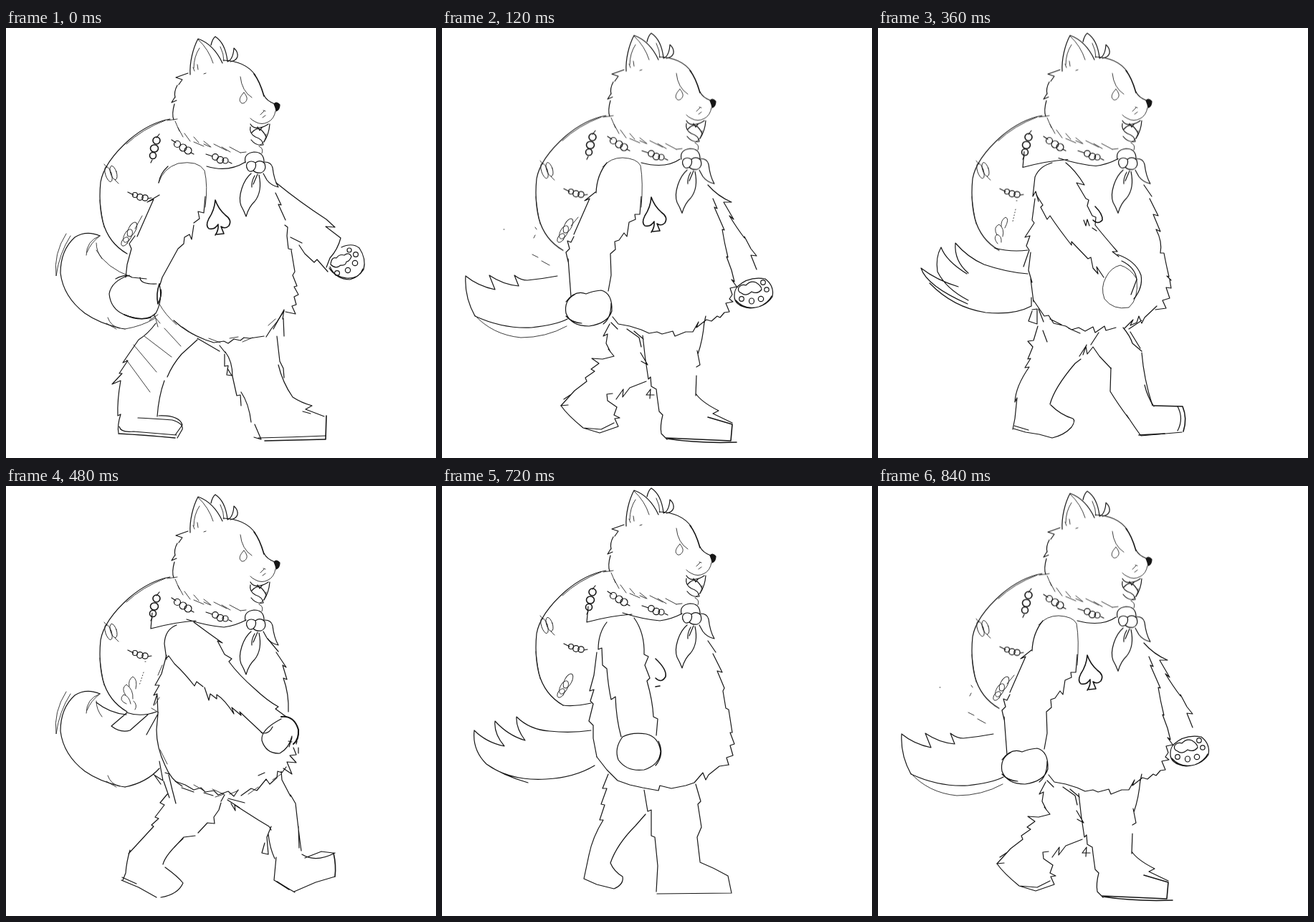
Animation of 600 by 600 pixels, one loop 0.96 s. Source, as an HTML page:

```html
<!DOCTYPE html>
<html lang="en">
<head>
<meta charset="utf-8">
<title>Walking wolf sketch</title>
<style>
  html, body { margin: 0; width: 100%; height: 100%; overflow: hidden; background: #fff; }
  svg { display: block; width: 100vw; height: 100vh; fill: none; stroke: #161616; stroke-width: 1.2; stroke-linecap: round; stroke-linejoin: round; }
  .thin { stroke-width: .9; stroke: #2a2a2a; }
  .bold { stroke-width: 1.6; }
  .nose { fill: #161616; }

  /* The walk swings from stride to stride and back in eight hard steps. */
  .pose, .bob { animation: 960ms step-end infinite; }
  .pose { visibility: hidden; }
  .stride { animation-name: stride; }
  .drop { animation-name: drop; }
  .pass { animation-name: pass; }
  .reach { animation-name: reach; }
  .swing { animation-name: swing; }
  .bob { animation-name: bob; }
  @keyframes stride { 0% { visibility: visible } 12.5%, 100% { visibility: hidden } }
  @keyframes drop { 0%, 25% { visibility: hidden } 12.5%, 87.5%, 100% { visibility: visible } }
  @keyframes pass { 0%, 37.5%, 87.5%, 100% { visibility: hidden } 25%, 75% { visibility: visible } }
  @keyframes reach { 0%, 50%, 75%, 100% { visibility: hidden } 37.5%, 62.5% { visibility: visible } }
  @keyframes swing { 0%, 62.5%, 100% { visibility: hidden } 50% { visibility: visible } }
  @keyframes bob {
    0%, 50%, 100% { transform: translateY(0) }
    12.5%, 37.5%, 62.5%, 87.5% { transform: translateY(-4.7px) }
    25%, 75% { transform: translateY(-9px) }
  }
</style>
</head>
<body>
<svg viewBox="0 0 600 600">
  <defs>
    <path id="spade" class="bold" d="M292 240Q291 254 283 266Q278 276 283 280Q291 282 296 274Q297 282 292 289M294 288L304 287 300 277Q306 281 311 276Q316 268 306 261Q296 252 292 240"/>
    <g id="curl">
      <path d="M131 290Q112 282 96 292Q76 310 76 342Q80 375 110 398Q130 412 160 419L166 420"/>
      <path class="thin" d="M84 287Q66 315 70 346Q74 315 90 290M131 290Q112 297 112 317M131 290Q118 300 113 313M126 300Q126 312 134 322M142 404Q146 416 158 419M140 412L154 420"/>
    </g>
    <g id="scarf">
      <path d="M204 177L202 199Q235 190 265 188M252 186Q280 195 304 197Q320 195 335 187"/>
    </g>
    <g id="fringe" class="thin">
      <ellipse cx="176" cy="281" rx="5" ry="11" transform="rotate(28 176 281)"/>
      <ellipse cx="170" cy="290" rx="5" ry="10" transform="rotate(28 170 290)"/>
      <ellipse cx="166" cy="298" rx="4" ry="7" transform="rotate(35 166 298)"/>
    </g>
  </defs>

  <g class="bob">
    <!-- ears and tuft -->
    <path d="M257 65C256 48 261 28 268 15Q290 23 302 49M286 24Q288 15 292 12Q306 21 309 46M309 47Q317 44 318 28Q324 33 323 40Q321 46 313 47"/>
    <path class="thin" d="M262 56Q262 40 270 28M267 51l1 7M268 16Q283 30 289 49M263 60l-2 -5M299 26Q304 36 304 46M276 64l3 -1"/>
    <!-- head -->
    <path d="M303 45Q334 46 348 66M375 106Q364 102 360 94M254 63L237 69 246 72 241 79M236 96L231 104 238 101M239 80Q234 89 236 97M235 106Q231 120 234 128"/>
    <path class="bold" d="M346 64Q354 74 360 95"/>
    <path class="nose" d="M374 106Q378 102 382 107Q382 114 377 116Q376 110 374 106Z"/>
    <path class="thin" d="M327 68Q329 88 343 97M332 90C326 96 324 102 329 105C333 106 337 101 336 97Q335 93 332 90"/>
    <path class="thin" d="M376 116Q374 127 366 131Q357 136 348 131Q342 128 341 126M355 121l5 -5M358 125l4 -3M359 115l3 1"/>
    <path d="M341 134Q345 141 354 139Q361 138 366 134M341 138Q339 147 348 152Q358 155 359 163Q349 165 342 156M368 134Q367 148 360 159M343 146Q350 138 356 142Q362 148 363 153M351 138l3 5 4 -5"/>
    <path class="thin" d="M236 130l6 14M240 139l7 13M249 147l8 11M262 152l7 8M262 159l14 6M276 158l10 8M285 166l-9 -4M290 162l18 9M301 166l12 7M312 166l15 8M327 174l8 -1M353 165Q360 168 357 175M363 148Q363 158 354 164"/>

    <!-- bundle -->
    <path d="M229 127Q200 132 172 156Q137 187 132 215Q129 245 135 270Q143 300 169 315"/>
    <path class="thin" d="M222 129Q190 141 168 162M131 240Q133 262 137 278M225 129l14 -2"/>
    <path d="M214 148l-4 5M204 184l-2 4M231 156l6 4M258 174l4 2M279 176l9 3M311 187l4 2M170 229l8 4M198 238l5 -1"/>
    <g class="bold">
      <circle cx="210" cy="157" r="5"/><ellipse cx="207" cy="168" rx="5.5" ry="5"/><circle cx="205" cy="178" r="4.5"/>
    </g>
    <circle cx="239" cy="162" r="4.5"/><circle cx="247" cy="167" r="5"/><circle cx="254" cy="171" r="5"/>
    <circle cx="292" cy="180" r="4.3"/><circle cx="299" cy="184" r="4.7"/><circle cx="306" cy="185" r="4"/>
    <circle cx="180" cy="233" r="3.5"/><circle cx="187" cy="236" r="4.3"/><circle cx="194" cy="237" r="4.2"/>
    <g class="thin">
      <ellipse cx="143" cy="204" rx="4.2" ry="11" transform="rotate(-18 143 204)"/>
      <ellipse cx="150" cy="202" rx="4.2" ry="10" transform="rotate(-18 150 202)"/>
    </g>
    <path class="thin" d="M137 190l4 5M152 212l5 5"/>

    <!-- knot -->
    <path d="M334 188Q331 175 346 173Q360 173 360 187M337 188Q342 184 348 188Q355 183 361 189Q364 199 356 202Q349 203 345 199Q339 202 337 197Q334 192 337 188M348 188Q350 194 345 199"/>
    <path d="M342 203C331 212 323 235 328 248Q332 255 335 263Q339 249 347 242Q358 228 353 205M347 206Q342 215 343 222"/>
    <path d="M361 187Q370 187 372 195Q374 212 380 222Q370 220 364 212L359 203M351 204L345 218"/>
  </g>

  <g class="pose stride">
    <use href="#spade"/>
    <use href="#curl"/>
    <use href="#fringe"/>
    <path d="M468 306Q483 299 493 307Q503 322 499 337Q491 350 476 349Q458 347 451 335M452 333Q460 351 480 351Q494 347 498 336"/>
    <path d="M453 330Q454 319 461 321Q465 315 472 317Q479 312 482 319Q479 326 475 326Q474 332 467 331Q460 337 453 330"/>
    <circle cx="462" cy="342" r="3.4"/><circle cx="477" cy="338" r="3.6"/><circle cx="487" cy="328" r="3.7"/><circle cx="488" cy="316" r="3.4"/><circle cx="479" cy="310" r="3"/>
    <path class="thin" d="M126 310Q140 335 174 347M166 420Q190 416 208 405M200 408l12 -8M205 400l10 12"/>
    <path class="thin" d="M213 216Q219 196 240 189Q268 184 277 199Q282 220 278 250M190 262l-10 18"/>
    <path d="M226 193Q215 203 213 216M214 233L197 243 206 239 183 291M280 193Q310 202 334 187"/>
    <path d="M180 290L172 301 175 308 169 330 167 348M278 235L276 258 268 256 270 266 262 272M262 275L259 295 256 288 249 292 248 301 240 308Q228 330 218 348L215 358"/>
    <path d="M172 345Q147 353 144 371Q146 392 165 400Q195 412 209 398Q219 380 214 357M153 350Q168 342 176 348L196 350M187 348Q187 358 210 357"/>
    <path class="bold" d="M214 357Q209 371 212 385Q218 373 216 365M165 400Q185 409 202 404"/>
    <path d="M377 216Q410 243 447 267L459 278 446 277 467 293Q463 309 452 321L447 334M397 292L413 300M409 303L417 315 430 327 434 323 449 340"/>
    <path d="M376 230L384 247 380 246 390 268M389 275L393 278 392 290 394 308 399 309M398 310L403 340 400 345 406 360 402 361 408 372 402 375 405 386 399 388 404 399 390 396"/>
    <path d="M388 395L378 410 370 420 363 431M360 430L340 433 332 432 327 436 318 434 310 440 304 437 290 439 278 435Q252 425 234 408"/>
    <path class="thin" d="M214 385Q222 400 238 414M246 417l14 10M283 433l16 6M312 433l12 -2M330 438l14 -6M366 415l10 -9"/>
    <path class="thin" d="M168 463L201 508M178 442L210 480M193 430L231 459M221 419L244 444M207 399L212 417"/>
    <path d="M209 412Q198 427 185 435L163 467 170 464 158 482 162 482 148 497 160 492Q155 520 156 541L160 539Q155 555 157 565M267 435L245 455Q232 470 225 487M221 492Q213 514 211 542M267 433L298 451"/>
    <path d="M184 544Q205 545 232 547Q248 552 246 560L239 572M213 541Q242 540 246 554L236 568M158 556Q160 565 178 563L238 568"/>
    <path class="bold" d="M157 566Q195 568 236 572M361 576L445 574M447 541L446 574"/>
    <path d="M298 443L306 453M305 455L305 472 310 471 308 484 315 485 309 475M306 452Q316 465 316 486L322 513 327 512 328 527M328 508Q339 524 342 550M347 553L356 574 346 571M352 572Q400 571 446 569"/>
    <path d="M373 420L388 393 386 406M378 430L382 465 387 475 388 488M380 470Q386 495 400 515M400 515Q412 523 427 527L418 532 444 542M387 405L388 430M414 535L425 538"/>
  </g>

  <g class="pose drop">
    <use href="#spade" y="-4"/>
    <use href="#fringe" y="-5"/>
    <path d="M412 361Q428 346 451 350Q464 360 461 375Q451 390 430 391Q407 388 408 373Q408 366 412 361M410 380Q422 394 442 389Q455 384 460 374"/>
    <path d="M414 362Q418 357 424 359Q430 352 438 355Q446 360 446 365Q440 372 432 368Q424 375 418 370Q412 368 414 362"/>
    <circle cx="418" cy="378" r="3.3"/><ellipse cx="432" cy="381" rx="3.5" ry="4"/><circle cx="445" cy="378" r="3.7"/><circle cx="453" cy="365" r="3.2"/><circle cx="448" cy="355" r="3.3"/>
    <path d="M33 346Q31 375 46 402Q85 420 125 418Q160 414 175 406M33 346Q50 360 74 365L66 345Q85 358 107 360L101 345Q110 352 119 352Q140 350 161 346"/>
    <path class="thin" d="M45 400Q70 428 110 432Q145 432 174 416M126 316l8 4M139 325l11 6M128 293l2 -4M86 281l1 0M130 278l2 3"/>
    <path d="M215 230Q216 205 230 188M214 229L199 241 206 238 184 288M278 188Q312 197 332 183"/>
    <path class="thin" d="M224 194Q235 181 252 181Q272 182 277 192Q281 215 278 250M190 264l-10 12"/>
    <path d="M184 291L180 299 175 297 178 308 173 313 176 326M176 322Q178 350 180 375M278 235L276 260 269 260 270 267 261 271 258 291 254 286 247 296 241 298 242 309 235 315 236 345 232 367"/>
    <path d="M185 372Q170 380 173 398Q180 416 205 416Q232 412 237 395Q238 370 222 366Q210 367 201 371M173 382Q186 365 201 371M236 384Q236 405 225 413M173 402Q181 411 195 412"/>
    <path d="M371 219Q385 235 404 243L393 243 407 267 401 262Q412 280 422 293M422 291L431 308 439 318 431 317 439 337"/>
    <path d="M378 238L384 252 380 250 394 282 391 281Q394 300 399 320L397 319 404 338 408 354 404 351 412 362"/>
    <path d="M411 361L402 363 405 372 401 378 406 382 396 384 401 396 394 397 388 404 384 402 376 409 369 407 355 418 358 410 350 424 340 424 325 430 322 423 307 427 300 424 289 426 278 421 262 416 246 413 238 403M366 411L368 402"/>
    <path d="M234 413L225 430 231 427 229 440 235 452M232 448L240 458 224 462 209 461 219 468 208 476 213 479 200 488 202 493 185 506 166 527 176 526"/>
    <path d="M166 527Q175 540 197 558L220 565 246 556 241 545 248 544 240 540 244 529 231 520 230 511 238 510M197 558L222 560 240 551M243 518L253 504 252 515 262 502 285 493M170 518l9 -6"/>
    <path d="M236 411L245 420M258 420L275 432 278 445M277 453L287 470 278 465M268 423L281 434M280 429Q283 460 288 490L291 487 292 500 299 504 300 513 303 535 308 540Q304 555 306 566L314 574"/>
    <path d="M285 512L291 504 290 517M285 512L296 512M366 410Q364 435 357 455M356 450L360 470 355 473M355 485L354 513M354 510Q362 522 386 534L378 538 405 551"/>
    <path class="bold" d="M371 543L405 553 403 576 313 572M314 573Q360 580 411 578"/>
  </g>

  <g class="pose pass">
    <use href="#scarf" y="-9"/>
    <use href="#fringe" y="-9"/>
    <path d="M45 341Q42 368 62 388Q95 412 145 409Q185 407 213 390M45 341Q62 358 87 363Q72 345 74 328Q92 348 116 355Q103 338 104 322Q122 340 150 342Q180 345 208 341M62 388Q85 404 120 414M169 306Q185 308 208 303"/>
    <path d="M230 190Q218 205 218 228L223 226 224 250 230 255Q232 280 236 298L242 294Q243 325 250 350M268 184Q283 205 282 235L288 238 283 250 290 268 286 272Q294 300 295 322L301 325 299 348"/>
    <path d="M252 350Q240 366 246 382Q258 399 282 396Q304 389 305 370Q302 350 285 346Q265 343 252 350M302 356Q311 375 298 390"/>
    <path class="bold" d="M298 241Q314 256 312 266Q306 276 298 268M298 280l6 -1"/>
    <path d="M216 232L212 264 206 286 212 284 207 300 211 304 205 328 211 334 211 352 216 378M371 216L382 232M378 234L391 260 384 258 394 282 392 286 396 310 400 312 405 344 402 344 408 360 402 362 406 376 397 379 400 389"/>
    <path d="M400 389L387 391 372 403 368 410 364 400 352 414 340 418 320 422 304 418 302 425 280 421 262 417 245 411 230 396 216 378"/>
    <path d="M232 402L224 422 230 422 222 444 227 445 220 466 225 466Q210 490 205 515L198 548M198 548L216 556 240 562Q254 556 252 545Q240 538 235 526M235 526Q244 500 270 474L284 458"/>
    <path d="M282 424L287 454 292 452 292 488 297 490 301 530 299 566M354 416L361 440 357 444 362 476 356 490 360 524M360 525Q380 533 399 544L404 568 300 569"/>
  </g>

  <g class="pose reach">
    <use href="#scarf" y="-4.5"/>
    <path d="M60 335Q82 352 112 361M60 335Q68 360 125 385M126 380Q95 364 83 340Q80 320 88 306Q95 325 124 343M126 342Q106 325 108 300Q125 320 148 330Q180 341 209 343"/>
    <path d="M72 356Q105 390 150 397Q190 401 214 388L214 376M163 307Q185 313 209 310"/>
    <path class="thin" d="M167 301Q160 293 166 288Q173 290 172 299M166 289Q160 278 169 274Q177 280 174 291M172 277Q171 268 178 264Q184 266 177 279"/>
    <path d="M193 241l2 0M192 253l-4 17" class="thin" stroke-dasharray="1 3"/>
    <path d="M262 188Q275 198 288 219L277 216 290 238 294 240 292 248 299 262 304 264 303 275Q315 290 334 312L327 312 336 319M243 188Q225 193 219 208L216 235 220 228 224 242"/>
    <path d="M221 233L230 247 227 250 236 267 240 262Q252 280 270 303L270 298 293 322 297 320 300 335 307 343 305 333 315 348"/>
    <path class="thin" d="M318 348Q310 362 316 378Q328 394 350 390Q364 378 361 350Q352 335 338 331Q325 334 318 348"/>
    <path d="M334 316Q360 325 367 345Q370 362 357 378M340 325Q359 334 361 351L353 372"/>
    <path class="bold" d="M303 249Q314 260 313 268Q307 275 300 268"/>
    <path d="M287 268l3 8 2 -9 3 9M299 279l6 4M219 238L215 268 218 272 205 292 212 290 207 304 211 310 203 333M213 313L210 338 215 355M213 350L217 382"/>
    <path d="M371 219L382 235M379 238L391 262 384 260 394 284 388 281Q397 298 394 314L399 314Q402 330 406 347L403 346 409 352M407 351L409 363 402 362 407 377 397 380 402 391 387 393"/>
    <path d="M389 388L372 404 368 412 364 402 361 411 352 415 356 407 344 419M332 418L318 422 316 416 303 425 300 417 289 423 280 418 270 421 262 416 245 412 238 401 232 402 217 380M240 406L256 414M266 419L282 426M350 420L368 408"/>
    <path d="M215 393L222 392 222 413 210 409 215 395M223 416L217 436 209 437 216 445 209 462 213 461 205 474 211 473Q192 500 191 522L194 516 191 545 188 560M224 392L231 410M230 422L236 438"/>
    <path d="M189 559L206 564 225 567 243 572Q260 568 270 557Q276 548 272 545Q255 540 241 526M190 555L210 561M240 525Q246 502 275 468L283 462M281 458L290 444 292 455 300 445 309 458 325 475M308 425L297 442M291 442L286 456"/>
    <path d="M325 474L324 507Q335 525 350 545M347 540Q360 560 367 569L424 564M342 418Q352 430 355 440L368 451M352 424L366 447M368 453Q371 490 383 527"/>
    <path class="bold" d="M385 527L425 528Q432 545 426 563M364 568L400 566"/>
    <path d="M418 528Q427 545 418 562M372 498Q376 515 385 528"/>
  </g>

  <g class="pose swing">
    <use href="#scarf"/>
    <use href="#curl"/>
    <path d="M126 302Q145 317 168 319M168 317L147 335Q160 345 173 341L198 319M168 316Q188 323 210 315M166 420Q196 414 214 394M206 402l10 14"/>
    <path class="thin" d="M168 304Q156 299 164 291Q172 293 174 304M167 292Q160 282 168 277Q178 284 177 297M172 280Q170 270 177 266Q184 270 181 283M194 245l1 0M178 300Q184 306 180 312"/>
    <path d="M192 260l-6 18" class="thin" stroke-dasharray="1 3"/>
    <path d="M262 190Q282 205 302 219L295 216 305 235 315 241 311 245Q325 264 347 283Q365 300 380 308L376 311 391 322M238 194Q222 200 221 220L224 242"/>
    <path d="M224 240L227 237 235 248Q250 262 263 279L266 273 275 280M277 281L283 299 285 290 294 297 294 291Q305 298 318 318L315 309 328 320 326 315 358 345"/>
    <path d="M384 325Q355 340 357 355Q363 374 382 373Q395 366 399 349M356 344Q366 348 372 336M399 351l-4 13M394 356l5 1"/>
    <path d="M384 322Q402 320 408 340Q409 354 401 360" stroke-width="2.1"/>
    <path d="M224 236L217 262 208 278 214 278 206 292 211 290 206 306M211 292L212 318 196 347M212 318L210 340Q210 365 222 390Q230 410 246 419"/>
    <path class="thin" d="M218 250l-6 14M208 305l6 -10M203 310l10 6M215 368l10 20M262 417l14 8M288 423l16 7M312 430l12 -5M338 430l14 -10M372 410l12 -8M292 434l12 -4"/>
    <path d="M365 213L380 231M377 232L391 253 386 250 392 270 387 268Q395 290 394 315M408 365l0 8M405 360l1 -4M401 365L405 375 396 376 405 386 392 385 399 402 387 394"/>
    <path d="M391 392L385 400 379 398 378 407 368 416 363 409 350 425 342 422 328 432M324 424L318 433 310 426 296 431 290 425 278 427 272 421 262 424 250 417 236 412M245 421L262 427M276 428L289 432M352 404L361 400"/>
    <path d="M214 384L219 411 208 404M222 400L228 402M227 403L232 424 237 443M225 430L215 442 221 445 208 462 213 464 203 473 206 475 183 500 171 513M173 508Q168 525 167 540L163 550M220 412L228 435"/>
    <path d="M161 550L185 560 210 574M162 546L182 555M216 574Q240 570 247 554Q240 545 222 532M219 528Q222 515 247 492M235 504L248 490 264 488M268 484L281 470 291 471 290 462 297 452 300 442M300 440L305 431"/>
    <path d="M309 438L326 449M314 443L320 453 319 445 352 466 367 475 370 480M310 436L333 442M370 475L364 490 366 514 357 512 361 498M366 486Q368 505 375 520M377 518L374 550 403 567"/>
    <path d="M384 398L385 410 397 433M397 431L404 443Q408 480 412 509M408 475L409 505M413 514Q432 526 459 512M417 519L440 510 456 512"/>
    <path class="bold" d="M457 512Q461 530 459 545M378 552L395 563"/>
    <path d="M459 545L432 553 402 566"/>
  </g>
</svg>
</body>
</html>
```
